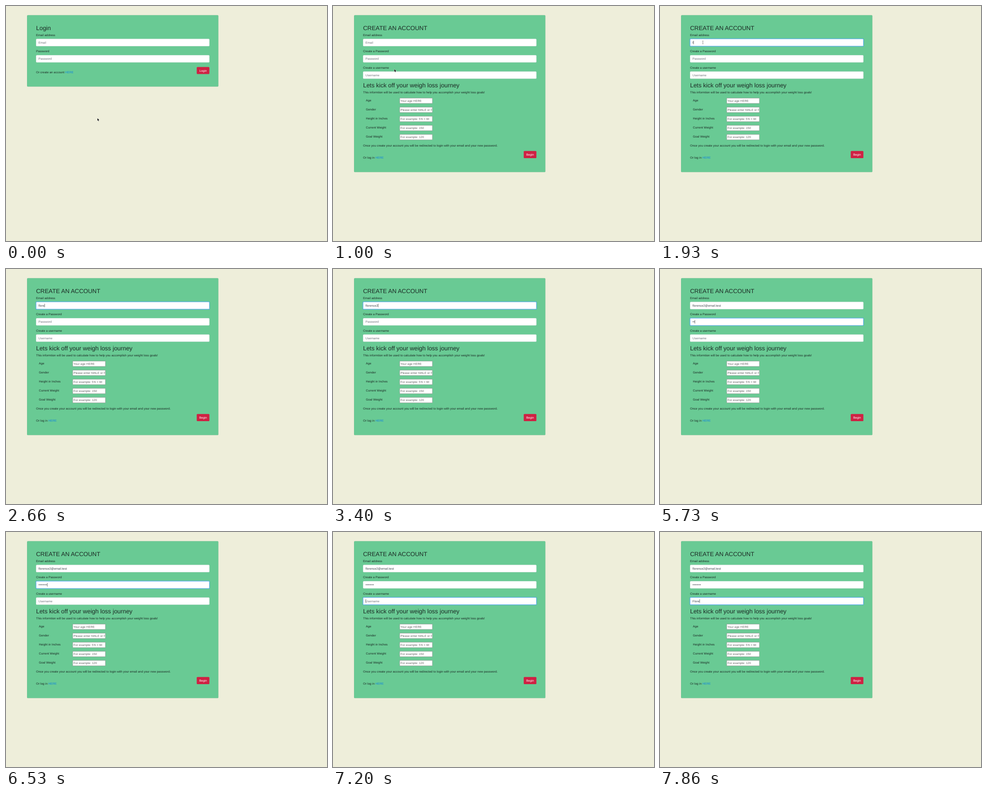
Write an HTML page with a canvas that moves like this. It is 640 by 468 pixels and loops after 8000 ms.

```html
<!DOCTYPE html>
<html lang="en">
<head>
<meta charset="utf-8">
<title>Sign-up form</title>
<style>
  html, body { margin: 0; width: 100%; height: 100%; overflow: hidden; background: #eeeeda; }
  canvas { display: block; width: 640px; height: 468px; }
</style>
</head>
<body>
<canvas id="stage"></canvas>
<script>
const LOOP = 8000;
const FONT = '"Liberation Sans", Arial, sans-serif';
const INK = '#1c2b25', HINT = '#6f767c', LINK = '#1285dd';
const SMALL = 6.02, LEFT = 60, FIELD_W = 345.5, FIELD_H = 14.3;
const OPEN_FORM = 800;

const canvas = document.getElementById('stage');
const ctx = canvas.getContext('2d');
const dpr = window.devicePixelRatio || 1;
canvas.width = 640 * dpr;
canvas.height = 468 * dpr;

// Typing bursts: [first key time, time per key, characters]
const fields = [
  { y: 65.6, hint: 'Email', focus: 1500, blur: 5300,
    keys: [[1900, 180, 'florence2'], [3600, 145, '@email.'], [4670, 125, 'test']] },
  { y: 98, hint: 'Password', focus: 5300, blur: 6900,
    keys: [[5540, 130, '\u2022'.repeat(8)]] },
  { y: 130.4, hint: 'Username', focus: 6900, blur: Infinity,
    keys: [[7270, 140, 'Flore']] }
];

const details = [
  ['Age', 'Your age HERE', 64],
  ['Gender', 'Please enter MALE or FEMALE', 64],
  ['Height in Inches', "For example: 5'6 = 66", 58],
  ['Current Weight', 'For example: 150', 58],
  ['Goal Weight', 'For example: 120', 58]
];

const clamp = v => Math.max(0, Math.min(1, v));
const ease = v => { v = clamp(v); return v * v * (3 - 2 * v); };

function text(str, x, y, color = INK, size = SMALL, align = 'left') {
  ctx.font = `${size}px ${FONT}`;
  ctx.textAlign = align;
  ctx.fillStyle = color;
  ctx.fillText(str, x, y);
}

function width(str) {
  ctx.font = `${SMALL}px ${FONT}`;
  return ctx.measureText(str).width;
}

function box(x, y, w, h, r, fill, stroke, line = 0.4) {
  ctx.beginPath();
  ctx.roundRect(x, y, w, h, r);
  ctx.fillStyle = fill;
  ctx.fill();
  if (stroke) {
    ctx.strokeStyle = stroke;
    ctx.lineWidth = line;
    ctx.stroke();
  }
}

function card(bottom) {
  box(42, 18.2, 381.4, bottom - 18.2, 1.6, '#69ca94', 'rgba(0,0,0,.125)');
}

function button(label, y) {
  box(380.3, y, 25.2, 14.2, 1.5, '#cf2143');
  text(label, 392.9, y + 9.2, '#fff', SMALL, 'center');
}

function linkLine(lead, y) {
  text(lead, LEFT, y);
  text('HERE', LEFT + width(lead), y, LINK);
}

function input(y, value, hint, glow = 0) {
  if (glow > 0) {
    box(LEFT - 1, y - 1, FIELD_W + 2, FIELD_H + 2, 2.2, `rgba(0,123,255,${0.35 * glow})`);
  }
  box(LEFT, y, FIELD_W, FIELD_H, 1.5, '#fff', '#ced4da');
  if (glow > 0) {
    box(LEFT, y, FIELD_W, FIELD_H, 1.5, '#fff', `rgba(90,170,245,${glow})`, 0.8);
  }
  text(value || hint, 64.8, y + 9.2, value ? '#40494f' : HINT);
}

function typed(keys, t) {
  let value = '', last = -Infinity;
  for (const [start, step, chars] of keys) {
    if (t < start) break;
    const n = Math.min(chars.length, Math.floor((t - start) / step) + 1);
    value += chars.slice(0, n);
    last = start + (n - 1) * step;
  }
  return { value, last };
}

function drawField(f, t) {
  const { value, last } = typed(f.keys, t);
  const glow = ease((t - f.focus) / 150) * (1 - ease((t - f.blur) / 150));
  input(f.y, value, f.hint, glow);
  const idle = t - Math.max(last, f.focus);
  if (t >= f.focus && t < f.blur && idle % 1000 < 500) {
    ctx.fillStyle = '#222';
    ctx.fillRect(65 + width(value), f.y + 3.6, 0.6, 7);
  }
}

function drawDetail([label, hint, room], i) {
  const y = 183.4 + i * 18.1;
  text(label, 65.6, y + 6.4);
  box(133, y, 65.2, 10.6, 0, '#fff', '#8b9690', 0.75);
  ctx.save();
  ctx.beginPath();
  ctx.rect(133.6, y, room, 10.6);
  ctx.clip();
  text(hint, 134.5, y + 7.5, '#686868');
  ctx.restore();
}

function loginPage() {
  card(160.5);
  text('Login', LEFT, 47.7, INK, 12.05);
  text('Email address', LEFT, 60);
  input(65.6, '', 'Email');
  text('Password', LEFT, 92.4);
  input(98, '', 'Password');
  linkLine('Or create an account ', 133.8);
  button('Login', 121.4);
}

function accountPage(t) {
  card(330.8);
  text('CREATE AN ACCOUNT', LEFT, 47.6, INK, 11.9);
  text('Email address', LEFT, 60);
  text('Create a Password', LEFT, 92.4);
  text('Create a username', LEFT, 124.8);
  fields.forEach(f => drawField(f, t));
  text('Lets kick off your weigh loss journey', LEFT, 162.3, INK, 12.03);
  text('This informtion will be used to calculate how to help you accomplish your weight loss goals!', LEFT, 174.4);
  details.forEach(drawDetail);
  text('Once you create your account you will be redirected to login with your email and your new password.', LEFT, 280.2);
  linkLine('Or log in ', 304.2);
  button('Begin', 288.8);
}

function arrow(x, y) {
  ctx.beginPath();
  [[0, 0], [0, 5.2], [1.2, 4.1], [2.1, 6], [2.9, 5.6], [2.1, 3.8], [3.7, 3.7]]
    .forEach(([dx, dy]) => ctx.lineTo(x + dx, y + dy));
  ctx.closePath();
  ctx.strokeStyle = '#fff';
  ctx.lineWidth = 0.8;
  ctx.stroke();
  ctx.fillStyle = '#111';
  ctx.fill();
}

function beam(x, y) {
  ctx.fillStyle = '#555';
  ctx.fillRect(x - 0.3, y - 3, 0.6, 6);
  ctx.fillRect(x - 1, y - 3.3, 2, 0.5);
  ctx.fillRect(x - 1, y + 2.8, 2, 0.5);
}

function pointer(t) {
  if (t > 2080) return;
  const a = ease((t - 60) / 600), b = ease((t - 900) / 550);
  const x = 182.3 - 56.3 * a - 40.5 * b;
  const y = 223.4 - 92.4 * a - 58.5 * b;
  if (t > OPEN_FORM && y < 79.5) beam(x, y);
  else arrow(x, y);
}

function draw(t) {
  ctx.setTransform(dpr, 0, 0, dpr, 0, 0);
  ctx.textRendering = 'geometricPrecision';
  ctx.fillStyle = '#eeeeda';
  ctx.fillRect(0, 0, 640, 468);
  if (t < OPEN_FORM) loginPage();
  else accountPage(t);
  pointer(t);
}

const begin = performance.now();
function frame() {
  draw((performance.now() - begin) % LOOP);
  requestAnimationFrame(frame);
}
draw(0);
requestAnimationFrame(frame);
</script>
</body>
</html>
```
